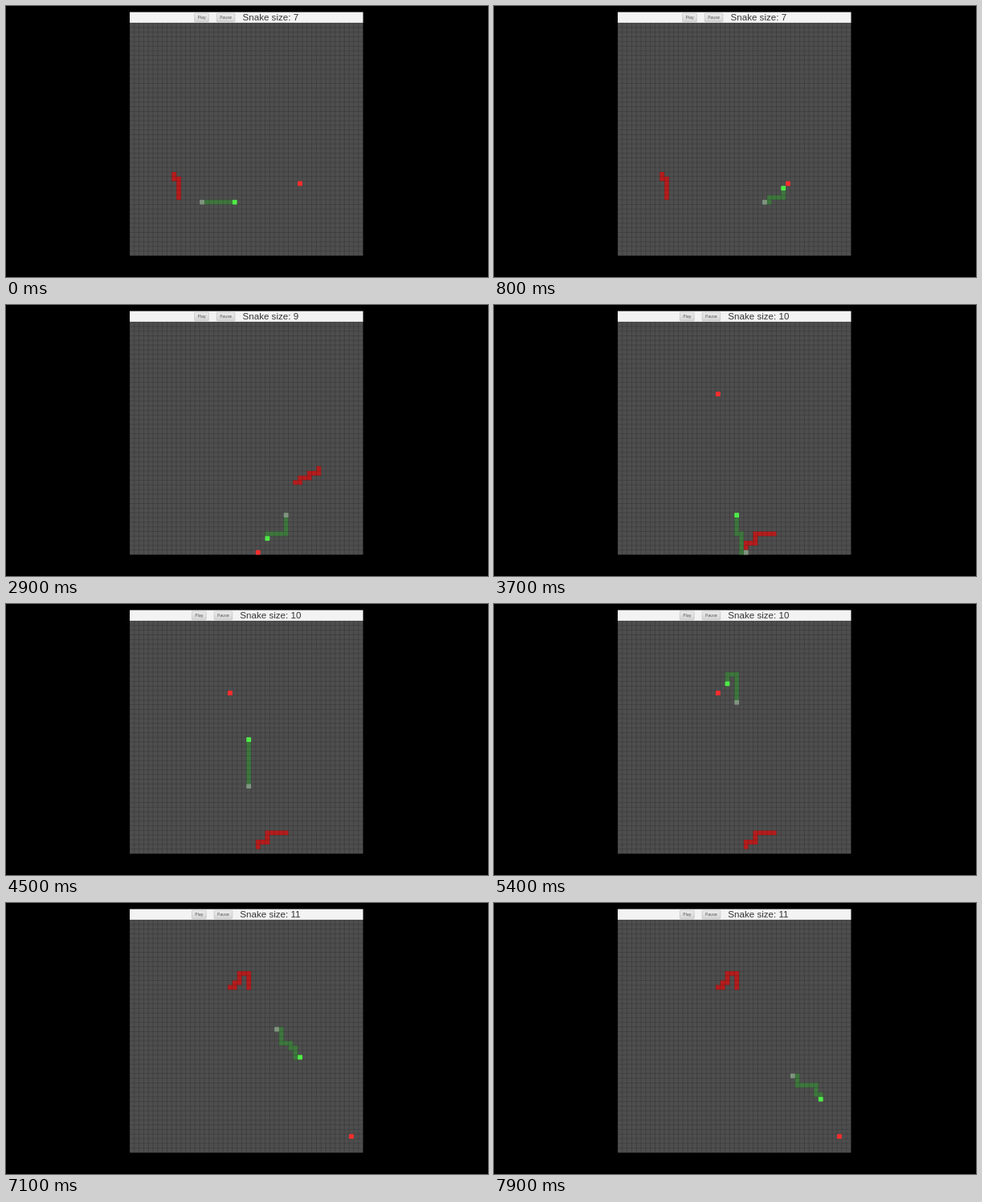
Animation, 600 px wide and 338 px high, one loop 8000 ms. Source, as an HTML page:

```html
<!DOCTYPE html>
<html lang="en">
<head>
<meta charset="utf-8">
<title>Snake</title>
<style>
  html, body { margin: 0; width: 100%; height: 100%; overflow: hidden; background: #000; }
  svg { display: block; width: 600px; height: 338px; }
  .label { font: 11.6px "Liberation Sans", Arial, sans-serif; fill: #333; }
  .button text { font: 5.3px "Open Sans", sans-serif; fill: #4a4a4a; text-anchor: middle; }
  .button rect { fill: url(#face); stroke: #bcbcbc; stroke-width: .6; }
</style>
</head>
<body>
<svg viewBox="0 0 600 338" xmlns="http://www.w3.org/2000/svg">
  <defs>
    <linearGradient id="face" x2="0" y2="1">
      <stop offset="0" stop-color="#ececec"/>
      <stop offset="1" stop-color="#d3d3d3"/>
    </linearGradient>
  </defs>
  <rect width="600" height="338" fill="#000"/>
  <rect x="154" y="7.6" width="290.5" height="13.4" fill="#f3f3f3"/>
  <g id="bar">
    <g class="button">
      <rect x="234.6" y="9.2" width="17.8" height="10.6" rx="1"/>
      <text x="243.5" y="16.1">Play</text>
    </g>
    <g class="button">
      <rect x="262.3" y="9.2" width="22.6" height="10.6" rx="1"/>
      <text x="273.6" y="16.1">Pause</text>
    </g>
    <text id="label" class="label" x="294.5" y="18.3"></text>
  </g>
  <rect x="154" y="21" width="290.5" height="290.5" fill="#4e4e4e"/>
  <path id="trail" fill="#b51d1d"/>
  <path id="body" fill="#3f773f"/>
  <path id="grid" fill="none" stroke="#000" stroke-opacity=".24" stroke-width=".7"/>
  <path id="tail" fill="#7f957f"/>
  <path id="food" fill="#fa2e2e"/>
  <path id="head" fill="#50ec48"/>
</svg>
<script>
const CELL = 5.81, LEFT = 154, TOP = 21, COUNT = 50;
const LOOP = 8000, FRAME = 100, START = 19, START_SIZE = 7;

// Direction and length of each straight run, from cell (9, 32).
const RUNS = "D1 R1 D5 R22 U1 R3 U3 R1 U1 R2 U1 R2 U2 L3 D2 L3 D8 L1 D5 L4 D2 L2 D2 " +
  "L1 U4 L1 U34 L2 D2 L1 D1 L1 D2 R3 D1 R2 D1 R2 D3 R2 D2 R2 D3 R2 D1 R1 D2 R2 D4 " +
  "R1 D2 R4 D2 R1 D9 R4";
const STEP = { U: [0, -1], D: [0, 1], L: [-1, 0], R: [1, 0] };

// Path indices where food lies, and ticks during which the snake rests.
const MEALS = [7, 37, 45, 77, 125, 182];
const RESTS = [19, 28, 29, 30, 31, 64, 113];

const el = id => document.getElementById(id);
const draw = (id, cells) => el(id).setAttribute("d", cells.map(square).join(""));

function square([col, row]) {
  return `M${(LEFT + col * CELL).toFixed(2)} ${(TOP + row * CELL).toFixed(2)}h${CELL}v${CELL}h-${CELL}z`;
}

function buildPath() {
  const cells = [[9, 32]];
  for (const run of RUNS.split(" ")) {
    const [dx, dy] = STEP[run[0]];
    for (let n = +run.slice(1); n > 0; n--) {
      const [x, y] = cells[cells.length - 1];
      cells.push([x + dx, y + dy]);
    }
  }
  return cells;
}

function buildGrid() {
  const span = COUNT * CELL;
  let d = "";
  for (let i = 0; i <= COUNT; i++) {
    const at = i * CELL;
    d += `M${LEFT + at} ${TOP}v${span}M${LEFT} ${TOP + at}h${span}`;
  }
  el("grid").setAttribute("d", d);
}

const path = buildPath();
let shown = -1;

function render(time) {
  const tick = 2 * Math.floor((time % LOOP) / FRAME);
  if (tick === shown) return;
  shown = tick;

  const head = START + tick - RESTS.filter(r => r <= tick).length;
  const eaten = MEALS.filter(m => m <= head).length - 1;
  const size = START_SIZE + eaten;
  const meal = MEALS[eaten];

  draw("trail", path.slice(meal - size, meal));
  draw("body", path.slice(head - size + 1, head));
  draw("tail", [path[head - size]]);
  draw("head", [path[head]]);
  draw("food", [path[MEALS[eaten + 1]]]);

  el("label").textContent = "Snake size: " + size;
  el("bar").setAttribute("transform", `translate(${size > 9 ? -3.2 : 0} 0)`);
}

buildGrid();
render(0);
const begin = performance.now();
function loop() {
  render(performance.now() - begin);
  requestAnimationFrame(loop);
}
requestAnimationFrame(loop);
</script>
</body>
</html>
```
